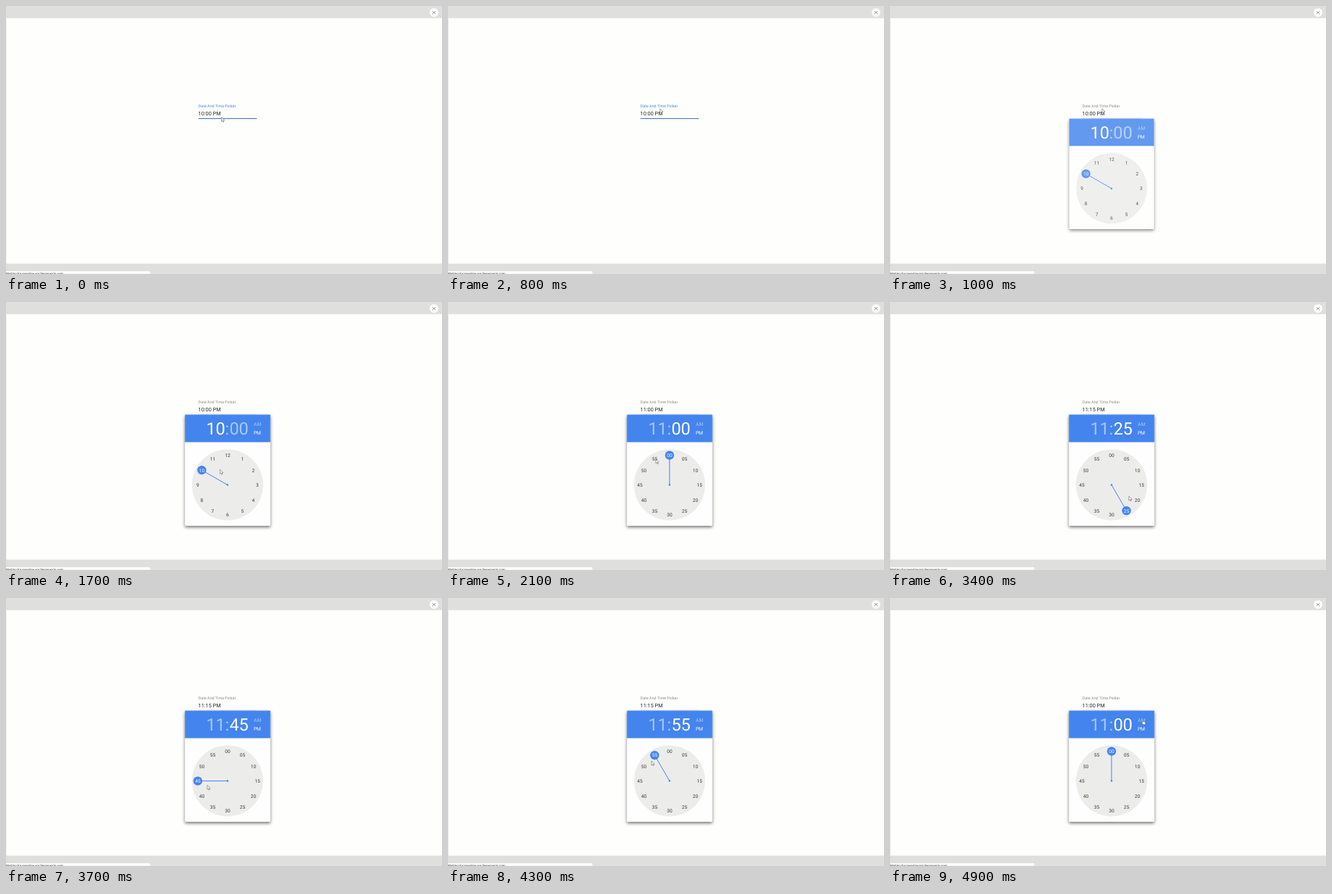
An HTML page for the animation above (5000 ms loop, 600 px wide and 370 px high).

```html
<!DOCTYPE html>
<html lang="en">
<head>
<meta charset="utf-8">
<title>Time picker</title>
<style>
  html, body { margin: 0; width: 100%; height: 100%; overflow: hidden; background: #fefefc; }
  svg { display: block; width: 600px; height: 370px; font-family: Roboto, sans-serif; text-rendering: geometricPrecision; }
  #card { transform-origin: 305px 155.5px; }
  #shadow { filter: drop-shadow(0 2px 2px rgba(0, 0, 0, .55)); }
  #dial text { font-size: 6.6px; text-anchor: middle; }
</style>
</head>
<body>
<svg viewBox="0 0 600 370">
  <rect width="600" height="370" fill="#fefefc"/>
  <rect width="600" height="16.8" fill="#dfdfdd"/>
  <rect y="355.6" width="600" height="14.4" fill="#dfdfdd"/>
  <rect y="16.8" width=".6" height="338.8" fill="#e2e2e0"/>
  <circle cx="589" cy="9" r="6.2" fill="#fff" stroke="#d2d2d0" stroke-width=".4"/>
  <path d="M586.9 6.9l4.2 4.2m0-4.2l-4.2 4.2" stroke="#777" stroke-width=".7"/>
  <path d="M0 365.7H197.5Q199 365.7 199 367.2V370H0Z" fill="#fdfdfc" stroke="#cacac8" stroke-width=".4"/>
  <text x="0" y="371.2" font-size="4.4" fill="#333">Waiting for meadow.api.fennorwick.com...</text>

  <text id="label" x="264.7" y="140" font-size="5.4">Date And Time Picker</text>
  <text id="field" x="264.6" y="151" font-size="7.3" fill="#262626"></text>
  <rect id="line" x="264.7" y="154.9" width="80.4"/>

  <g id="card">
    <rect id="shadow" x="246.2" y="155.5" width="117.6" height="153.5" rx="1" fill="#fefefe"/>
    <path d="M246.2 193.6V156.5q0-1 1-1h115.6q1 0 1 1V193.6Z" fill="#4484ee"/>
    <g fill="#fff" font-size="23.5">
      <text id="hour" x="301.8" y="182.8" text-anchor="end"></text>
      <text x="301.6" y="182.8" opacity=".55">:</text>
      <text id="minute" x="307.4" y="182.8"></text>
      <text x="341.1" y="171.2" font-size="6.7" opacity=".55">AM</text>
      <text x="340.9" y="183.1" font-size="6.7">PM</text>
    </g>
    <circle cx="304.9" cy="252.6" r="49" fill="#ececeb"/>
    <g id="dial">
      <line id="hand" x1="304.9" y1="252.6" stroke="#4484ee" stroke-width="1"/>
      <circle cx="304.9" cy="252.6" r="1.25" fill="#4484ee"/>
      <circle id="knob" r="6.2" fill="#4484ee"/>
    </g>
  </g>

  <g id="cursor" fill="#fff" stroke="#555" stroke-width=".55" stroke-linejoin="round">
    <path id="arrow" d="M0 0V5.8L1.4 4.6L2.3 6.7L3.3 6.3L2.4 4.3L4.2 4.1Z"/>
    <path id="pointer" d="M0 .5Q.6-.4 1.2.5V2.5L3.6 3Q4.4 3.2 4.3 4L3.8 6.6H.9L-1.1 4Q-.9 3.2 0 3.8Z"/>
  </g>
</svg>
<script>
const LOOP = 5000, STEP = 100, CX = 304.9, CY = 252.6, RING = 41;
const OPEN = 800, HOUR = 1900, MINUTES = 2100, QUARTER = 2700, DRAG = 3300, RESUME = 3900, DROP = 4500;
const $ = id => document.getElementById(id);
const set = (el, attrs) => { for (const k in attrs) el.setAttribute(k, attrs[k]); };
const pad = n => String(n).padStart(2, '0');
const ramp = (t, from, to) => Math.min(1, Math.max(0, (t - from) / (to - from)));

const polar = (i, r) => [CX + r * Math.sin(i * Math.PI / 6), CY - r * Math.cos(i * Math.PI / 6)];

// dial position during the drag: 3 o'clock to 9, a rest, then on to 12
const dragAt = t => 3 + 6 * ramp(t, DRAG, DRAG + 400) + 3 * ramp(t, RESUME, DROP);

function pickAt(t) {
  if (t < MINUTES) return t < HOUR ? 10 : 11;
  return t < QUARTER ? 0 : Math.round(dragAt(t)) % 12;
}

// straight cursor moves: start, end, target
const moves = [
  [100, 600, 291.8, 141.8], [1200, 1700, 294.6, 231.5], [1800, HOUR, 286, 217],
  [2600, QUARTER, 325.2, 236], [2900, 3200, 341.8, 181.8], [DROP, 4900, 347.4, 168.2]
];

function cursorAt(t) {
  let x = 296.6, y = 153.6;
  for (const [from, to, tx, ty] of moves) {
    // while dragging, the cursor orbits just behind the hand
    if (from === DROP && t > DRAG)
      [x, y] = polar(dragAt(t) - .4, 28.5 + 13 * ramp(t, RESUME, DROP));
    const k = ramp(t, from, to);
    x += (tx - x) * k;
    y += (ty - y) * k;
  }
  return [x, y];
}

const digits = Array.from({ length: 12 }, (_, i) => {
  const el = document.createElementNS('http://www.w3.org/2000/svg', 'text');
  const [x, y] = polar(i, RING);
  set(el, { x, y: y + 2.4 });
  return $('dial').appendChild(el);
});

function draw(t) {
  const open = t > OPEN, minutes = t >= MINUTES;
  const pick = pickAt(t), hour = t < HOUR ? 10 : 11;
  const saved = t > QUARTER && t <= DROP ? 15 : 0;
  const ease = 1 - (1 - ramp(t, OPEN, OPEN + 400)) ** 2.5;

  set($('label'), { fill: open ? '#8b8b8b' : '#4a86d8' });
  set($('line'), { fill: open ? '#b5b5b5' : '#4879c2', height: open ? .5 : 1.1 });
  $('field').textContent = `${hour}:${pad(saved)} PM`;

  $('card').style.opacity = open || t === OPEN ? ease : 0;
  $('card').style.transform = `scale(${.96 + .04 * ease})`;
  $('hour').textContent = hour;
  $('minute').textContent = minutes ? pad(pick * 5) : '00';
  set($('hour'), { opacity: minutes ? .55 : 1 });
  set($('minute'), { opacity: minutes ? 1 : .55 });

  const [x, y] = polar(pick, RING);
  set($('hand'), { x2: x, y2: y });
  set($('knob'), { cx: x, cy: y });
  digits.forEach((el, i) => {
    el.textContent = minutes ? pad(i * 5) : i || 12;
    set(el, { fill: i === pick ? '#fff' : '#3a3a3a' });
  });

  const [mx, my] = cursorAt(t);
  const linked = open && mx > 338 && my < 185;
  set($('cursor'), { transform: `translate(${mx} ${my})` });
  set($('arrow'), { visibility: linked ? 'hidden' : 'visible' });
  set($('pointer'), { visibility: linked ? 'visible' : 'hidden' });
}

let shown = -1;
function tick() {
  const t = Math.floor(performance.now() % LOOP / STEP) * STEP;
  if (t !== shown) draw(shown = t);
  requestAnimationFrame(tick);
}
tick();
</script>
</body>
</html>
```
